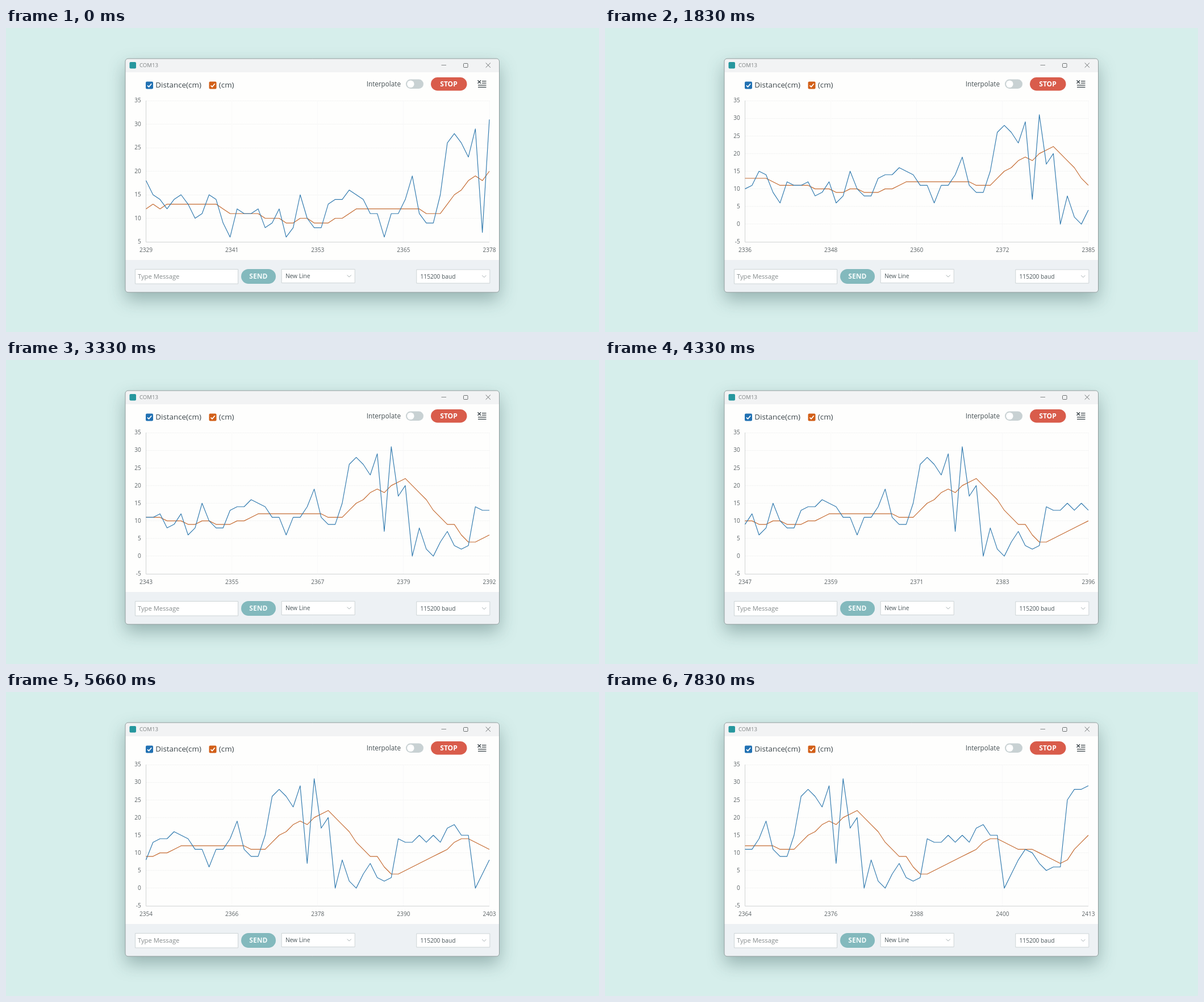
Write an HTML page with a canvas that moves like this. It is 1044 by 536 pixels and loops after 8000 ms.

```html
<!DOCTYPE html>
<html lang="en">
<head>
<meta charset="utf-8">
<title>Serial plotter</title>
<style>
  html, body { margin: 0; width: 100%; height: 100%; overflow: hidden; background: #d6eeeb; }
  canvas { display: block; width: 1044px; height: 536px; }
</style>
</head>
<body>
<canvas id="stage"></canvas>
<script>
const W = 1044, H = 536, LOOP = 8000, FPS = 6;
const canvas = document.getElementById('stage');
const ctx = canvas.getContext('2d');
const ratio = window.devicePixelRatio || 1;
canvas.width = W * ratio;
canvas.height = H * ratio;

// Distance readings; the second curve is their running mean over SPAN samples.
const FIRST = 2320, SPAN = 10, START = 2329, SHOWN = 50;
const readings = [
  8, 18, 7, 14, 14, 12, 10, 12, 12, 18, 15, 14, 12, 14, 15, 13, 10, 11, 15, 14,
  9, 6, 12, 11, 11, 12, 8, 9, 12, 6, 8, 15, 10, 8, 8, 13, 14, 14, 16, 15,
  14, 11, 11, 6, 11, 11, 14, 19, 11, 9, 9, 15, 26, 28, 26, 23, 29, 7, 31, 17,
  20, 0, 8, 2, 0, 4, 7, 3, 2, 3, 14, 13, 13, 15, 13, 15, 13, 17, 18, 15,
  15, 0, 4, 8, 11, 10, 7, 5, 6, 6, 25, 28, 28, 29
];
const reading = n => readings[n - FIRST];
function mean(n) {
  let sum = 0;
  for (let i = 0; i < SPAN; i++) sum += reading(n - i);
  return Math.floor(sum / SPAN);
}

// Arrival of samples: [step, samples received]
const arrivals = [[0, 0], [11, 7], [20, 14], [26, 18], [34, 25], [39, 30], [47, 35]];
function received(step) {
  const i = arrivals.findIndex(a => a[0] >= step);
  if (i < 1) return 0;
  const [s0, n0] = arrivals[i - 1], [s1, n1] = arrivals[i];
  return Math.round(n0 + (n1 - n0) * (step - s0) / (s1 - s0));
}

const plot = { left: 246.5, right: 851, top: 128, bottom: 377 };

function text(str, x, cy, size, color, align = 'left', weight = 400) {
  ctx.font = `${weight} ${size}px "Open Sans", "Noto Sans", sans-serif`;
  ctx.textAlign = align;
  ctx.fillStyle = color;
  ctx.fillText(str, x, cy + size * 0.357);
}

function box(x, y, w, h, r, fill, stroke) {
  ctx.beginPath();
  ctx.roundRect(x, y, w, h, r);
  if (fill) { ctx.fillStyle = fill; ctx.fill(); }
  if (stroke) { ctx.strokeStyle = stroke; ctx.lineWidth = 1; ctx.stroke(); }
}

function line(points, color, width = 1) {
  ctx.beginPath();
  points.forEach(([x, y]) => ctx.lineTo(x, y));
  ctx.strokeStyle = color;
  ctx.lineWidth = width;
  ctx.stroke();
}

function cross(x, y, r, color, width) {
  line([[x - r, y - r], [x + r, y + r]], color, width);
  line([[x - r, y + r], [x + r, y - r]], color, width);
}

function checkbox(x, y, color, label) {
  box(x, y, 13, 13, 2, color);
  line([[x + 3, y + 6.8], [x + 5.5, y + 9.4], [x + 10.2, y + 3.8]], '#fff', 1.7);
  text(label, x + 17.3, y + 5.6, 13.4, '#3c464b');
}

function select(x, y, label) {
  box(x, y, 129, 24, 0, '#fff', '#cdd4d6');
  text(label, x + 6.7, y + 12, 10.2, '#4a5559');
  line([[x + 115.5, y + 10.2], [x + 119, y + 13.7], [x + 122.5, y + 10.2]], '#a3adb0');
}

function drawWindow() {
  ctx.fillStyle = '#d6eeeb';
  ctx.fillRect(0, 0, W, H);

  ctx.save();
  ctx.shadowColor = 'rgba(40, 75, 75, 0.36)';
  ctx.shadowBlur = 30 * ratio;
  ctx.shadowOffsetY = 13 * ratio;
  box(210, 54, 658.5, 412, 5, '#fefefd');
  ctx.restore();

  ctx.save();
  box(210, 54, 658.5, 412, 5, '#fefefd');
  ctx.clip();
  ctx.fillStyle = '#f2f3f4';
  ctx.fillRect(210, 54, 659, 24);
  ctx.fillStyle = '#edf1f4';
  ctx.fillRect(210, 409, 659, 58);
  ctx.restore();
  box(210, 54, 658.5, 412, 5, null, '#929e9e');

  box(217.5, 60, 11.5, 11.5, 2, '#26979e');
  text('COM13', 235, 65.8, 9.6, '#7d8182');
  line([[766.5, 65.5], [775, 65.5]], '#85898a');
  box(805.5, 62.5, 7.5, 7, 1, null, '#6c7071');
  cross(848.8, 65.6, 4.1, '#6c7071', 1);
}

function drawControls() {
  checkbox(246, 94.5, '#2171b3', 'Distance(cm)');
  checkbox(357.5, 94.5, '#d25f18', '(cm)');

  text('Interpolate', 634.7, 99, 11.7, '#465054');
  box(704, 90.5, 31, 16.5, 8.25, '#c8d1d3');
  box(706, 92.5, 12.6, 12.6, 6.3, '#fff');
  box(748, 87, 63.5, 23.5, 11.75, '#d95c4b');
  text('STOP', 779.5, 98.6, 12, '#fff', 'center', 700);

  const ink = '#3a4449';
  cross(833.3, 95, 2.8, ink, 1.4);
  [[838, 93.7], [838, 97.2], [831, 100.8], [831, 104.4]].forEach(([x, y]) =>
    line([[x, y], [845.5, y]], ink, 1.3));

  box(227.5, 425.5, 181, 25.5, 0, '#fff', '#cdd4d6');
  text('Type Message', 232, 438.2, 11.2, '#858b8c');
  box(414, 425, 61, 26, 13, '#83b9bd');
  text('SEND', 444.3, 437.7, 12, '#f4fbfb', 'center', 700);
  select(485.2, 425.4, 'New Line');
  select(722.8, 426, '115200 baud');
}

function drawChart(first) {
  const last = first + SHOWN - 1;
  let low = Infinity;
  for (let n = first; n <= last; n++) low = Math.min(low, reading(n));
  const min = low < 1 ? -5 : 5, max = 35;
  const toX = n => plot.left + (n - first) / (SHOWN - 1) * (plot.right - plot.left);
  const toY = v => plot.bottom - (v - min) / (max - min) * (plot.bottom - plot.top);

  for (let v = min; v <= max; v += 5) {
    const y = toY(v);
    const snap = Math.floor(y) + 0.5;
    if (v > min) {
      ctx.setLineDash([2, 1]);
      line([[plot.left, snap], [plot.right, snap]], '#f0f1f1');
      ctx.setLineDash([]);
    }
    text(String(v), 237.8, y - 0.3, 10.1, '#5b6265', 'right');
  }
  for (let i = 0; i <= 4; i++) {
    const x = plot.left + i / 4 * (plot.right - plot.left);
    const snap = Math.floor(x) + 0.5;
    if (i) line([[snap, plot.top], [snap, plot.bottom]], '#f9f9f9');
    const n = first + Math.floor(i / 4 * (SHOWN - 1));
    text(String(n), x, 391.8, 10.1, '#5b6265', 'center');
  }
  line([[246.5, plot.top], [246.5, 377.5], [plot.right, 377.5]], '#d0d3d4');

  const curve = (f, color) => {
    const points = [];
    for (let n = first; n <= last; n++) points.push([toX(n), toY(f(n))]);
    line(points, color, 1.15);
  };
  curve(mean, '#c46a30');
  curve(reading, '#2f79ae');
}

function frame(now) {
  const t = now % LOOP;
  const step = Math.min(47, Math.floor((t + 7) * FPS / 1000));
  ctx.setTransform(ratio, 0, 0, ratio, 0, 0);
  ctx.lineJoin = 'round';
  drawWindow();
  drawControls();
  drawChart(START + received(step));
  requestAnimationFrame(frame);
}
frame(0);
</script>
</body>
</html>
```
